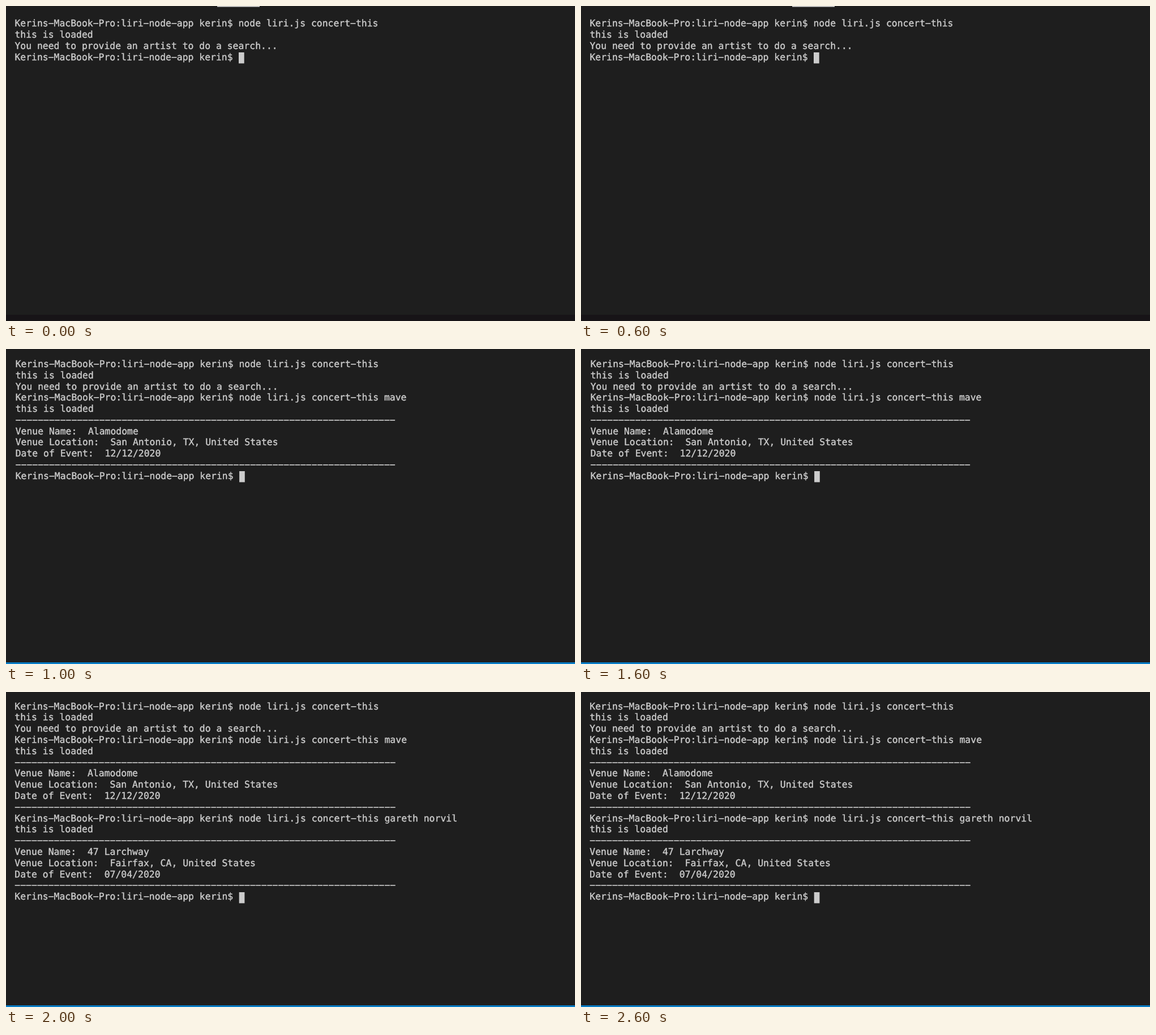
An HTML page with a canvas that plays this animation: 1005 by 557 pixels, repeating every 3000 ms.

```html
<!DOCTYPE html>
<html lang="en">
<head>
<meta charset="utf-8">
<title>Terminal session</title>
<style>
  html, body { margin: 0; width: 100%; height: 100%; overflow: hidden; background: #1e1e1e; }
  canvas { display: block; }
</style>
</head>
<body>
<canvas id="stage" width="1005" height="557"></canvas>
<script>
const ctx = document.getElementById("stage").getContext("2d");
const STEP = 1000;
const prompt = "Kerins-MacBook-Pro:liri-node-app kerin$ ";
const command = prompt + "node liri.js concert-this";
const rule = "-".repeat(68);

const search = (artist, venue, place, date) => [
  `${command} ${artist}`,
  "this is loaded",
  rule,
  `Venue Name:  ${venue}`,
  `Venue Location:  ${place}, United States`,
  `Date of Event:  ${date}`,
  rule,
];

const failed = [command, "this is loaded", "You need to provide an artist to do a search..."];
const first = search("mave", "Alamodome", "San Antonio, TX", "12/12/2020");
const second = search("gareth norvil", "47 Larchway", "Fairfax, CA", "07/04/2020");

// x, y: first baseline; pitch: character width; leading: line height
const scenes = [
  { x: 15.4, y: 36.4, pitch: 9.88, leading: 19.75, lines: failed },
  { x: 16.7, y: 32, pitch: 9.875, leading: 19.75, lines: [...failed, ...first] },
  { x: 15.3, y: 30.5, pitch: 9.9, leading: 19.8, lines: [...failed, ...first, ...second] },
];

function box(color, x, y, w, h) {
  ctx.fillStyle = color;
  ctx.fillRect(x, y, w, h);
}

// A thin outline thickens the strokes; the minus sign gives the terminal's wide dashes.
function write(line, x, y) {
  const text = line.replaceAll("-", "\u2212");
  ctx.fillText(text, x, y);
  ctx.strokeText(text, x, y);
}

function draw(index) {
  const { x, y, pitch, leading, lines } = scenes[index];
  box("#1e1e1e", 0, 0, 1005, 557);
  if (index === 0) {
    box("#e4e4e4", 373, 0, 75, 1.5);
    box("#171417", 0, 546, 1005, 11);
  } else {
    box("#087bc4", 0, 554, 1005, 3);
  }

  ctx.fillStyle = ctx.strokeStyle = "#cccccc";
  ctx.lineWidth = 0.4;
  ctx.textRendering = "geometricPrecision";
  ctx.font = `${pitch / 0.602}px "DejaVu Sans Mono", monospace`;
  [...lines, prompt].forEach((line, row) => write(line, x, y + row * leading));

  const cursorY = Math.round(y + lines.length * leading - 13.6);
  box("#cccccc", x + prompt.length * pitch + 0.4, cursorY, 9.7, 19.5);
}

function tick(now) {
  draw(Math.floor(now / STEP) % scenes.length);
  requestAnimationFrame(tick);
}
tick(0);
</script>
</body>
</html>
```
